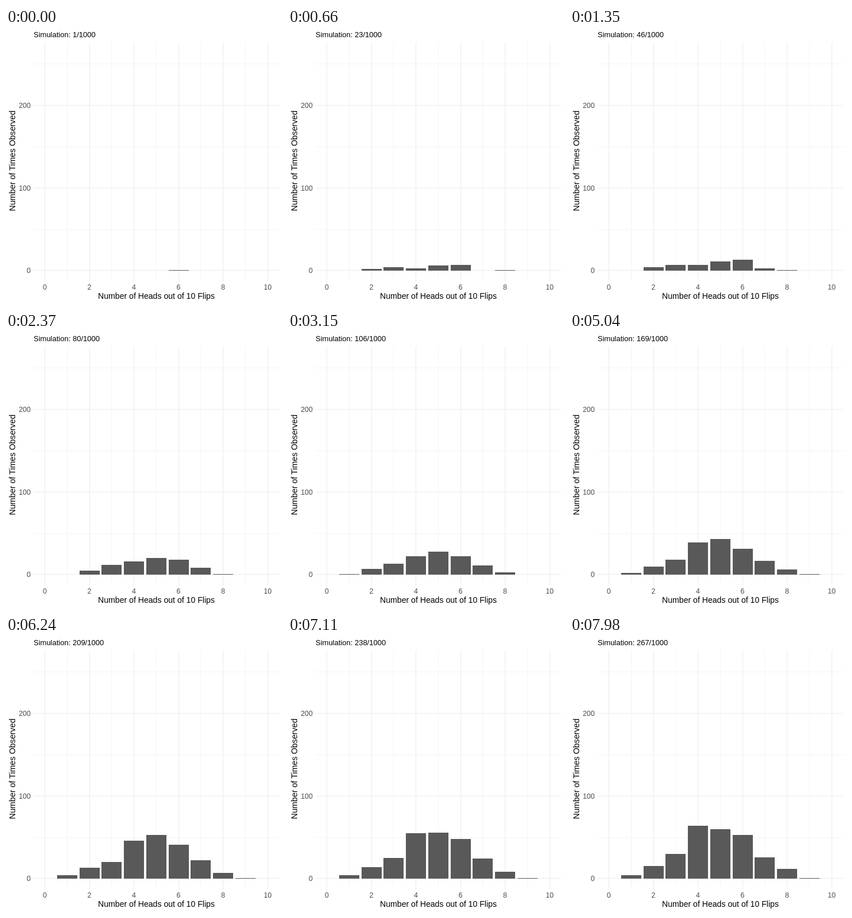
Write an HTML page that moves like this. It is 480 by 480 pixels and loops after 8 s.

```html
<!DOCTYPE html>
<html lang="en">
<head>
<meta charset="utf-8">
<title>Coin flip simulation</title>
<style>
  html, body { margin: 0; width: 100%; height: 100%; overflow: hidden; background: #fff; }
  svg { display: block; width: 100vw; height: 100vh; }
  text { font-family: "Liberation Sans", Arial, sans-serif; fill: #000; }
  .tick { font-size: 12.5px; fill: #4d4d4d; }
  .major { stroke: #ebebeb; }
  .minor { stroke: #f4f4f4; }
  .grid, .bars { shape-rendering: crispEdges; }
  .bars { fill: #595959; }
</style>
</head>
<body>
<svg id="stage" viewBox="0 0 480 480"></svg>
<script>
const NS = "http://www.w3.org/2000/svg";
const LOOP = 8000, STEP = 30;
const stage = document.getElementById("stage");

// Simulation number, then how often 1 to 9 heads came up by then.
const TALLY = [
  [1, 0, 0, 0, 0, 0, 1, 0, 0, 0],
  [28, 0, 3, 5, 4, 7, 8, 0, 1, 0],
  [46, 0, 4, 7, 7, 11, 13, 3, 1, 0],
  [80, 0, 5, 12, 16, 20, 18, 8, 1, 0],
  [109, 1, 7, 13, 23, 29, 22, 11, 3, 0],
  [133, 1, 8, 14, 31, 36, 25, 13, 4, 0],
  [136, 1, 8, 14, 32, 36, 26, 13, 4, 1],
  [169, 2, 10, 18, 39, 43, 31, 17, 6, 1],
  [190, 2, 11, 19, 43, 48, 36, 20, 6, 1],
  [209, 4, 13, 20, 46, 53, 41, 22, 7, 1],
  [244, 4, 14, 26, 57, 57, 49, 24, 8, 1],
  [267, 4, 15, 30, 64, 60, 53, 26, 12, 1]
];

const xAt = heads => 67.6 + 38.75 * heads;
const yAt = count => 421.48 - 1.437 * count;

function add(parent, tag, attrs, text) {
  const el = document.createElementNS(NS, tag);
  for (const key in attrs) el.setAttribute(key, attrs[key]);
  if (text !== undefined) el.textContent = text;
  parent.appendChild(el);
  return el;
}

const grid = add(stage, "g", { class: "grid" });
function vLine(heads, cls) {
  const x = Math.floor(xAt(heads)) + 0.5;
  add(grid, "line", { x1: x, x2: x, y1: 25, y2: 441, class: cls });
}
function hLine(count, cls) {
  const y = Math.round(yAt(count)) + 0.5;
  add(grid, "line", { x1: 48, x2: 475, y1: y, y2: y, class: cls });
}
for (let h = 1; h < 10; h += 2) vLine(h, "minor");
for (let c = 50; c <= 250; c += 100) hLine(c, "minor");
for (let h = 0; h <= 10; h += 2) {
  vLine(h, "major");
  add(stage, "text", { x: xAt(h), y: 455, class: "tick", "text-anchor": "middle" }, h);
}
for (let c = 0; c <= 200; c += 100) {
  hLine(c, "major");
  add(stage, "text", { x: 43, y: Math.round(yAt(c)) + 5, class: "tick", "text-anchor": "end" }, c);
}

const barGroup = add(stage, "g", { class: "bars" });
const bars = [];
for (let h = 1; h <= 9; h++) {
  const left = Math.round(xAt(h) - 17.44), right = Math.round(xAt(h) + 17.44);
  bars.push(add(barGroup, "rect", { x: left, width: right - left }));
}

add(stage, "text", { x: 261.5, y: 471, "font-size": 14.1, "text-anchor": "middle" },
  "Number of Heads out of 10 Flips");
add(stage, "text", { transform: "translate(16 231) rotate(-90)", "font-size": 14.3, "text-anchor": "middle" },
  "Number of Times Observed");
const title = add(stage, "text", { x: 48, y: 16, "font-size": 13 });

function draw(time) {
  const n = Math.floor((time % LOOP) / STEP) + 1;
  title.textContent = `Simulation: ${n}/1000`;
  let i = 0;
  while (i < TALLY.length - 2 && n >= TALLY[i + 1][0]) i++;
  const from = TALLY[i], to = TALLY[i + 1];
  const u = (n - from[0]) / (to[0] - from[0]);
  bars.forEach((bar, b) => {
    const count = Math.round(from[b + 1] + (to[b + 1] - from[b + 1]) * u);
    const top = Math.ceil(yAt(count));
    bar.setAttribute("y", top);
    bar.setAttribute("height", count ? 422 - top : 0);
  });
}

const start = performance.now();
function tick() {
  draw(performance.now() - start);
  requestAnimationFrame(tick);
}
draw(0);
requestAnimationFrame(tick);
</script>
</body>
</html>
```
